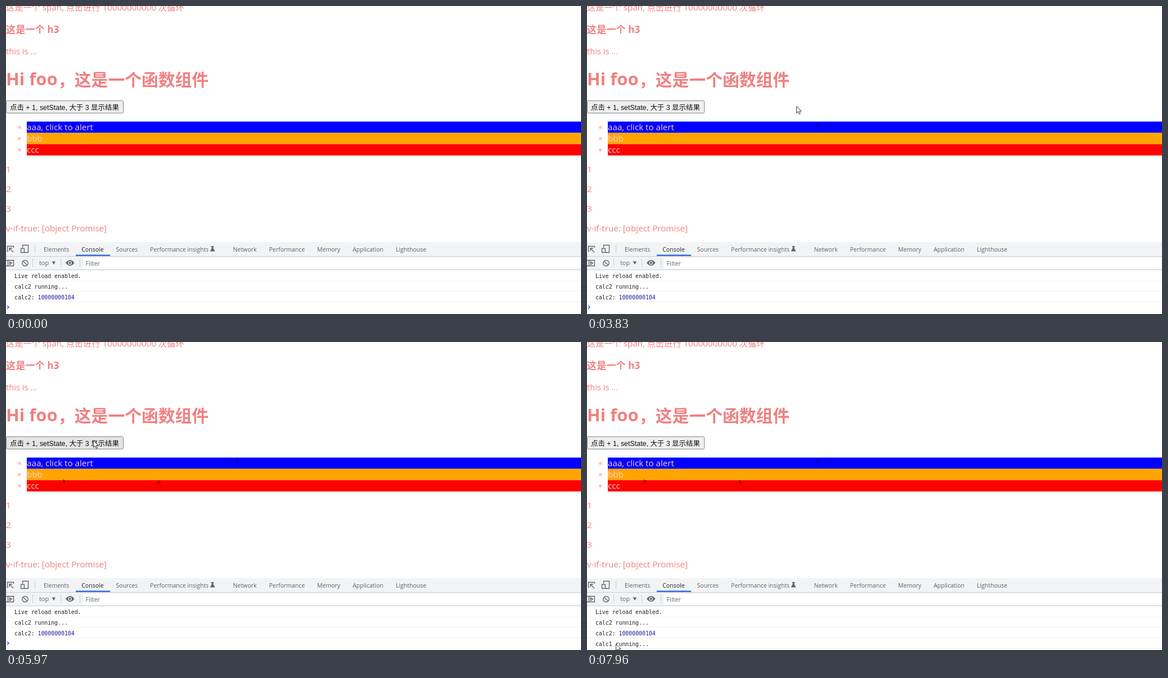
These frames come from a looping animation (1022 px wide and 548 px high, 7.99 s). An HTML page:

```html
<!DOCTYPE html>
<html lang="zh">
<head>
<meta charset="utf-8">
<title>Console demo</title>
<style>
  html, body { margin: 0; width: 100%; height: 100%; overflow: hidden; background: #fff; }
  svg { display: block; width: 100%; height: 100%; }
  text { white-space: pre; }
  .page { font: 450 15.2px "Open Sans", "Noto Sans CJK SC", "Noto Sans CJK", sans-serif; fill: #f08080; }
  .bold { font-weight: 700; }
  .item { fill: #ffcfd0; }
  .button { font: 12.45px "Liberation Sans", "Noto Sans CJK SC", "Noto Sans CJK", sans-serif; fill: #111; }
  .tabs { font: 10.5px "Open Sans", sans-serif; fill: #5f6368; }
  .tool { font-size: 10.9px; }
  .active { fill: #222; }
  .log { font: 9.85px "DejaVu Sans Mono", monospace; fill: #222; }
  .icon { fill: none; stroke: #5f6368; stroke-width: 1.3; }
  .rule { stroke: #f0f0f0; }
  .edge { stroke: #cacdd1; }
</style>
</head>
<body>
<svg viewBox="0 0 1022 548">
  <defs>
    <path id="arrow" d="M.5 .5V12.4L3.2 9.8L5.2 14.4L7.2 13.5L5.3 9.1H9Z"/>
  </defs>

  <g class="page" id="page">
    <text y="8">这是一个 span, 点击进行 10000000000 次循环</text>
    <text class="bold" y="48" font-size="17.2">这是一个 h3</text>
    <text y="86" font-size="14.7">this is ...</text>
    <text class="bold" y="141" font-size="31">Hi foo</text>
    <text class="bold" x="92" y="142" font-size="29.8">，这是一个函数组件</text>
    <text y="401">v-if-true: [object Promise]</text>
  </g>

  <rect id="button" x=".5" y="168.5" width="208" height="22" rx="2" stroke="#858585"/>
  <text class="button" x="7" y="185">点击 + 1, setState, 大于 3 显示结果</text>

  <g id="bars"></g>
  <g id="traces" fill-opacity=".42"></g>
  <g class="page"><g class="item" id="items"></g></g>

  <path fill="#f1f3f4" d="M0 420h1022v50H0z"/>
  <path fill="#fff" d="M137 448h885v19H137z"/>
  <path class="edge" d="M0 445.5h1022M0 469.5h1022M51.5 425v14M47.5 450v14M97.5 450v14M131.5 450v14"/>
  <path fill="#1a64dc" d="M124 442.600h61v2.200h-61z"/>
  <g class="tabs" id="tabs">
    <text class="tool" x="59" y="461">top</text>
    <text class="tool" x="141.5" y="462">Filter</text>
  </g>
  <g class="icon">
    <path d="M4 436.500H2.500V427.500H13.500V430M6 431l7 7M6 436v-5h5"/>
    <path d="M29.500 430v-4.500H39.500V438.500H33M26.500 431.500h6v7h-6z"/>
    <path d="M-1 452.500H13.500V462.500H-1M3.500 452v10M6.500 455l4 2.500l-4 2.500z"/>
    <circle cx="34" cy="457.500" r="5.200"/>
    <path d="M30.500 454l7 7"/>
  </g>
  <g fill="#5f6368">
    <path d="M81.500 454.500h6.500l-3.250 5.500z"/>
    <path d="M364.500 427h5v1.200h-1v3l3 5.300h-9l3-5.300v-3h-1z"/>
    <path d="M106 457q8-10 15.500 0q-7.500 10-15.500 0z"/>
  </g>
  <circle cx="113.700" cy="457" r="2.700" fill="#5f6368" stroke="#f1f3f4" stroke-width="1.300"/>

  <g class="log" id="log"></g>
  <path id="prompt" d="M2 533l3 2.800l-3 2.800" fill="none" stroke="#1a5fe0" stroke-width="1.500"/>
  <use id="cursor" href="#arrow" fill="#fff" stroke="#333"/>
</svg>

<script>
const LOOP = 7990, SHOWN = 150, CLICKED = 6060;
const $ = id => document.getElementById(id);
const show = (el, on) => el.setAttribute("visibility", on ? "visible" : "hidden");

function add(parent, tag, attrs, content = "") {
  const el = document.createElementNS("http://www.w3.org/2000/svg", tag);
  for (const name in attrs) el.setAttribute(name, attrs[name]);
  el.textContent = content;
  parent.append(el);
  return el;
}

["1", "2", "3"].forEach((s, i) => add($("page"), "text", { y: 296 + 35 * i }, s));

["aaa, click to alert", "bbb", "ccc"].forEach((s, i) => {
  const y = 205.6 + 20.1 * i, fill = ["blue", "orange", "red"][i];
  add($("bars"), "rect", { x: 37, y, width: 985, height: 20.1, fill });
  add($("bars"), "circle", { cx: 24, cy: 216 + 20 * i, r: 2.8, fill: "pink" });
  add($("items"), "text", { x: 37, y: 221 + 20 * i }, s);
});

let tabX = 67;
for (const name of ["Elements", "Console", "Sources", "Performance insights", "Network",
  "Performance", "Memory", "Application", "Lighthouse"]) {
  const tab = add($("tabs"), "text", { x: tabX, y: 437 }, name);
  if (name === "Console") tab.setAttribute("class", "active");
  const flask = name.endsWith("insights") ? 21.5 : 0;
  tabX += tab.getComputedTextLength() + 22 + flask;
}

const lines = ["Live reload enabled.", "calc2 running...", "calc2: ", "calc1 running..."].map((s, i) => {
  const row = add($("log"), "g", {});
  const text = add(row, "text", { x: 15, y: Math.round(484 + 18.9 * i) }, s);
  if (s === "calc2: ") add(text, "tspan", { fill: "#1a1aa6" }, "10000000104");
  add(row, "path", { class: "rule", d: `M0 ${Math.floor(489 + 18.75 * i) + 0.5}h1022` });
  return row;
});

// Cursor moves: start, end, then the points passed, from where the last move ended
const moves = [
  [150, 470, [895, 531], [530, 387]],
  [1230, 1750, [408, 207], [372, 179]],
  [3829, 3830, [372, 178]],
  [4170, 4950, [270, 245], [101, 243], [108, 206], [149, 34]],
  [4980, 5460, [155, 175]],
  [5970, 6730, [172, 0]],
  [6800, 7220, [170, 98]],
  [7220, 7590, [30, 533]],
  [7620, 7650, [12, 536]],
  [7880, 7960, [51, 537]]
].map(([start, end, ...points]) => ({ start, end, points }));
moves.forEach((m, i) => i && m.points.unshift(moves[i - 1].points.at(-1)));

// A small dark trace stays where the cursor turned on a coloured bar
const traces = moves.flatMap(({ end, points }) => points
  .filter(([, y]) => y > 205 && y < 250)
  .map(([x, y]) => ({
    end, el: add($("traces"), "use", { href: "#arrow", transform: `translate(${x} ${y}) scale(.6)` })
  })));

const ease = k => k * k * k * (k * (6 * k - 15) + 10);

function tipAt(t) {
  const { start, end, points } = moves.findLast(m => t >= m.start) || moves[0];
  const k = Math.min(1, Math.max(0, (t - start) / (end - start)));
  const u = ease(k) * (points.length - 1);
  const i = Math.min(Math.floor(u), points.length - 2);
  return points[i].map((a, j) => Math.round(a + (points[i + 1][j] - a) * (u - i)));
}

function draw(now) {
  const t = now % LOOP, [x, y] = tipAt(t);
  const hover = x < 209 && y >= 168 && y < 191;
  $("button").setAttribute("fill", hover ? "#e5e5e5" : "#efefef");
  $("cursor").setAttribute("transform", `translate(${x} ${y})`);
  show($("cursor"), t >= SHOWN);
  show(lines[3], t >= CLICKED);
  show($("prompt"), t < CLICKED);
  traces.forEach(({ end, el }) => show(el, t >= end - 60));
  requestAnimationFrame(draw);
}
draw(performance.now());
</script>
</body>
</html>
```
